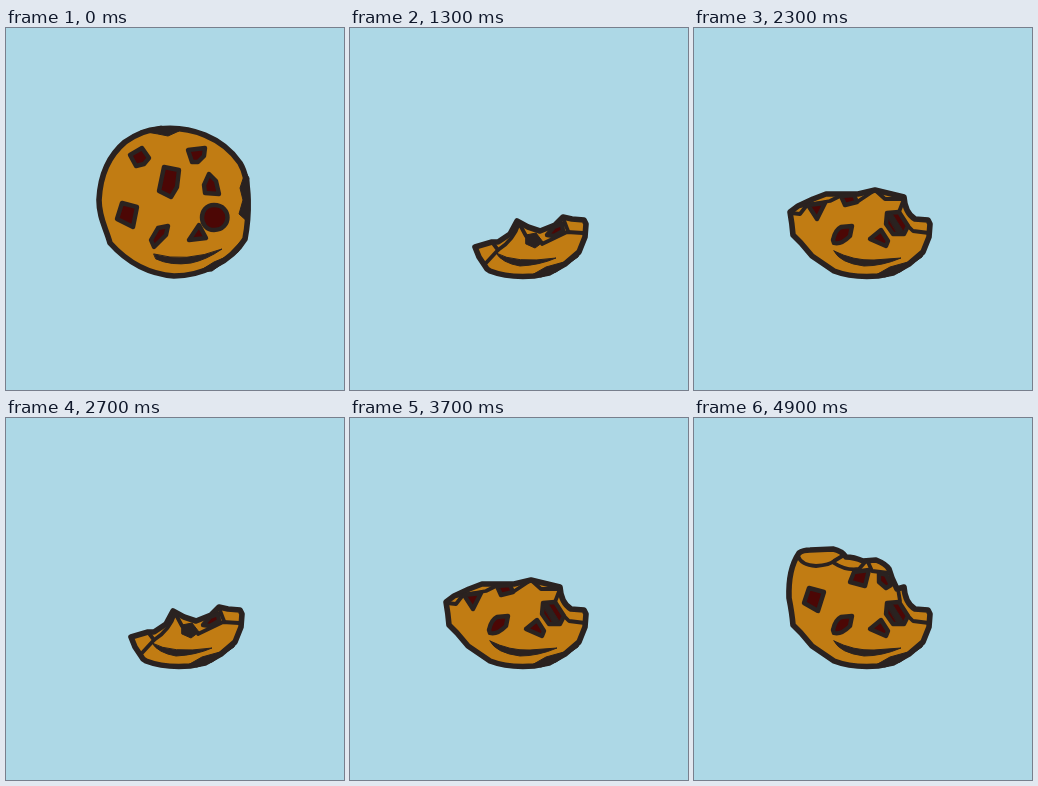
Animation, 338 px wide and 362 px high, one loop 5 s. Source, as an HTML page:

```html
<!DOCTYPE html>
<html lang="en">
<head>
<meta charset="utf-8">
<title>Cookie</title>
<style>
html, body { margin: 0; height: 100%; overflow: hidden; background: #add8e6; }
svg { display: block; width: 100vw; height: 100vh; }
path { stroke: #2a2220; stroke-linejoin: round; stroke-linecap: round; }
.body { fill: #c17c13; stroke-width: 5.6; }
.line { fill: none; stroke-width: 3.8; }
.dark { fill: #2a2220; stroke-width: 1; }
.chip { fill: #4c0705; stroke-width: 4.4; }
</style>
</head>
<body>
<svg id="stage" viewBox="0 0 338 362"></svg>
<script>
const stage = document.getElementById('stage');
const STEP = 200, LOOP = 5000;

const part = kind => (...ds) => ds.map(d => `<path class="${kind}" d="${d}"/>`).join('');
const body = part('body'), line = part('line'), dark = part('dark'), chip = part('chip');

// Rim shared by every bitten cookie, from the right tip to the lower left
const rim = 'L234 192 L236 196 L235 209 L229 224 L215 236 L199 245 L184 248 Q158 250 140 243 ';
const left = 'L118 228 L107 215 L99 207 Q98 195 95 180 ';
const bite = 'L203 171 L210 169 Q211 185 221 191 ';
const shade = dark('M182 247L196 239L214 234L231 221L228 229L206 244L191 249Z');
const smile = dark('M140 223Q160 233 180 232L207 230Q188 238 170 238Q146 235 140 223Z');
const crust = line('M213 197L219 203L235 205');
const chipLeft = chip('M115 170L130 174L124 193L110 185Z');
const chipOval = chip('M139 212Q141 202 147 199L158 198L156 208Q147 217 140 215Z');
const chipTri = chip('M187 202L194 213L192 218L176 211Z');
const chipRight = chip('M193 185L205 184L214 198L210 206L199 206L192 196Z') + dark('M192 186L197 184L209 203L204 206Z');
const chipTop = chip('M133 122L147 119L152 128L146 136L138 137Z');
const chipMid = chip('M164 141L178 144L169 166L155 163Z');
const face = shade + smile + crust + chipOval + chipTri + chipRight;

const poses = [
  // whole
  body('M152 101C185 97 217 110 234 135C245 153 243 190 239 211C225 234 195 248 168 248C142 246 121 234 104 215C100 200 93 190 93 172C94 150 100 130 119 114Q136 102 152 101Z') +
  dark('M135 103L155 98L173 103L162 108L152 106Z',
    'M234 134L243 150L243 195L233 186L237 172L234 160L238 148Z',
    'M240 208L220 229L208 234L192 244L206 243L232 224Z',
    'M148 226Q180 235 216 221Q200 232 185 235Q165 238 150 231Z') +
  chip('M124 127L136 120L143 130L138 136L130 138Z', 'M182 122L199 120L198 128L192 134L186 134Z',
    'M158 139L173 142L171 159L165 169L153 163Z', 'M203 146L210 153L213 166L199 165L198 157Z',
    'M116 175L131 179L127 199L111 191Z', 'M208 177C226 177 226 202 208 202C192 202 192 177 208 177Z',
    'M145 212L152 200L162 198L160 207L148 219Z', 'M193 197L200 210L183 212Z'),

  // right bite
  body('M95 180C91 158 104 131 128 109Q141 103 156 103L180 105L194 110L203 114Q202 123 197 131L195 139L201 143L197 150L197 160' + bite + rim + left + 'Z') +
  dark('M140 103L155 100L180 102L196 108L186 112L165 109Z') +
  line('M186 111Q194 122 188 130L189 144', 'M204 171L206 183') +
  chip('M196 117L201 119L196 128L194 123Z', 'M187 147L193 149L192 158L196 167L193 172L185 166L183 154Z') +
  chipTop + chipMid + chipLeft + face,

  // upper right gone
  body('M95 180C91 158 104 132 130 110Q142 104 156 102L166 108L175 114L181 123L188 129L193 140L197 152L195 161' + bite + rim + left + 'Z') +
  line('M154 104Q161 109 160 116L169 124L173 130L176 139L187 149', 'M168 122L176 115', 'M175 134L185 128', 'M204 171L206 183') +
  chip('M189 152L196 155L194 162L198 168L193 170L187 164Z') +
  chipTop + chipMid + chipLeft + face,

  // top gone
  body('M95 180Q94 151 105 135Q109 132 116 132L139 131Q148 133 152 139Q160 139 169 143L182 142Q192 146 195 151L198 160' + bite + rim + left + 'Z') +
  line('M104 138Q107 147 122 148Q136 147 140 143L150 137', 'M140 145Q152 153 165 151L172 143', 'M174 144L178 153L195 155', 'M204 171L206 183') +
  chip('M160 154L175 152L171 168L156 164Z', 'M185 155L192 157L197 167L192 170L185 164Z') +
  chipLeft + face,

  // upper half gone
  body('M96 184L104 178L119 171L132 166L148 166L164 166L181 162L210 169Q211 185 221 191' + rim + 'L118 228L107 215L99 207Q98 195 96 184Z') +
  line('M97 185L106 186L113 177L136 173L146 168', 'M104 178L113 177', 'M163 174L181 162L191 171L210 171', 'M210 171L205 184') +
  chip('M114 177L131 175L123 191Z', 'M147 168L160 167L163 174L151 177Z') + face,

  // lower left tip
  body('M100 207L112 198L126 199Q133 188 147 187L164 191L179 178L193 184L207 180Q213 189 221 191' + rim + 'L118 228L107 215Z') +
  line('M100 208L114 208L126 200', 'M128 200L139 198L147 189', 'M164 193L180 190L193 185') + face,

  // last slice
  body('M125 219L142 214L148 214L160 206L167 193L178 199L190 203L205 197L213 189L222 191' + rim + 'L137 241L129 229Z') +
  shade + dark('M146 225Q165 236 206 230Q190 237 170 238Q152 235 146 225Z') +
  line('M142 214L148 222L136 235', 'M148 222Q164 212 169 195L176 208', 'M192 216L217 204L233 205', 'M213 190L218 203') +
  chip('M197 207L204 199L212 196L213 203L204 208Z') +
  dark('M176 207L186 205L193 214L185 220L176 216Z')
];

stage.innerHTML = poses.map(p => `<g display="none">${p}</g>`).join('');
const groups = [...stage.children];
const start = performance.now();

function draw(now) {
  const t = Math.max(0, now - start) % LOOP;
  const current = Math.floor(t / STEP) % poses.length;
  groups.forEach((g, i) => g.setAttribute('display', i === current ? 'inline' : 'none'));
  requestAnimationFrame(draw);
}
draw(start);
</script>
</body>
</html>
```
